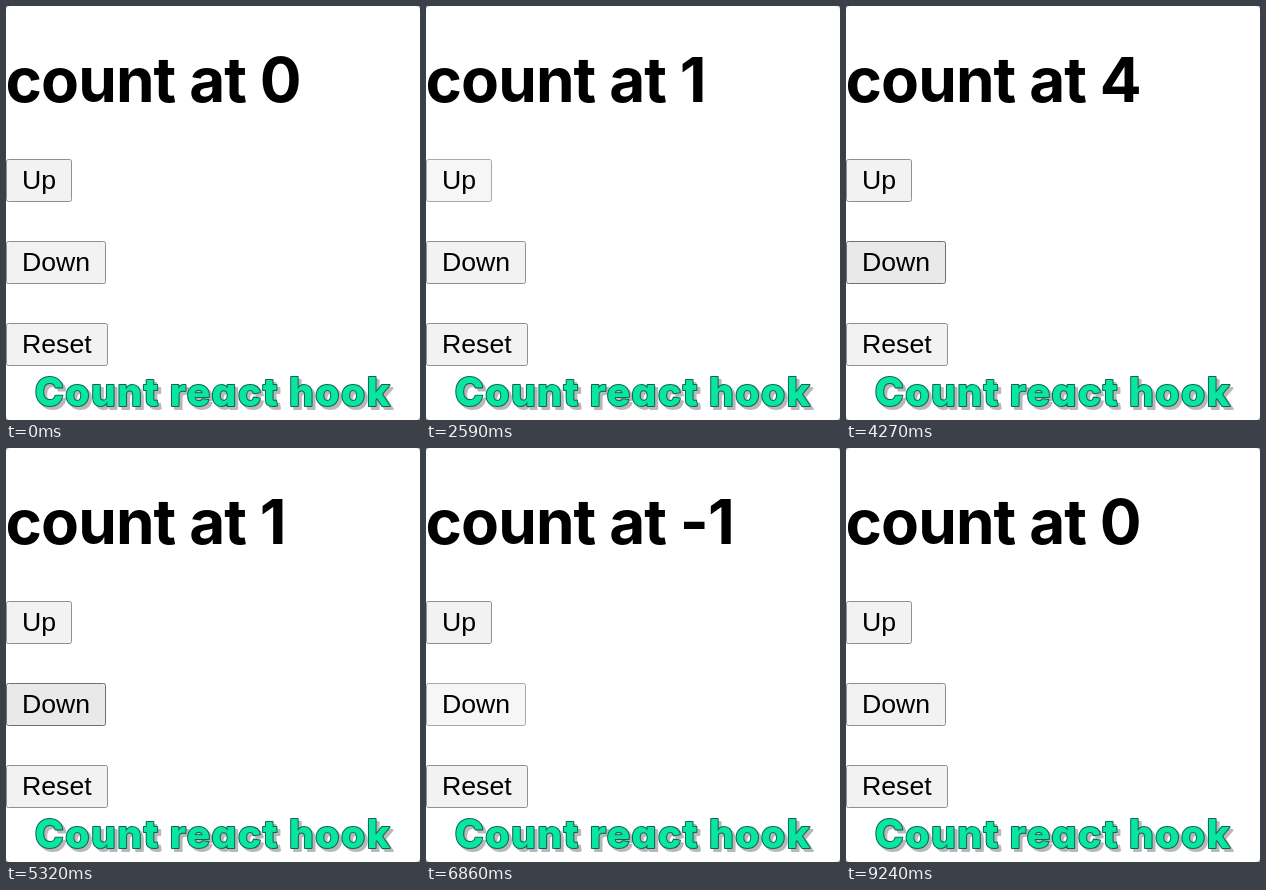
Recreate the animation shown at these times as an HTML page. Size 414 by 414 pixels, loop 9.87 s.

```html
<!DOCTYPE html>
<html lang="en">
<head>
<meta charset="utf-8">
<title>Count react hook</title>
<style>
  html, body { margin: 0; width: 100%; height: 100%; overflow: hidden; background: #999; }
  svg { display: block; width: 414px; height: 414px; }
  .heading { font: 700 62px Inter, sans-serif; letter-spacing: -.9px; }
  .button { font: 26.67px "Liberation Sans", Arial, sans-serif; }
  .button rect { fill: #f2f2f2; stroke: #909090; }
  .button.hover rect { fill: #e9e9e9; stroke: #707070; }
  .button.active rect { fill: #f6f6f6; stroke: #a8a8a8; }
  .caption {
    font: 800 39px Inter, sans-serif;
    font-feature-settings: "cv11";
    letter-spacing: 1.5px;
    text-anchor: middle;
    fill: #08e6a2;
    stroke: #0f6350;
    stroke-width: 2px;
    stroke-linejoin: round;
    paint-order: stroke;
    filter: drop-shadow(3px 3px .5px #b8b8b8);
  }
</style>
</head>
<body>
<svg viewBox="0 0 414 414">
  <rect width="414" height="414" rx="4" fill="#fff"/>
  <text class="heading" id="heading" x="-.5" y="95.5">count at 0</text>
  <g id="buttons"></g>
  <text class="caption" x="207" y="400">Count react hook</text>
</svg>
<script>
const LOOP = 9870;
const UP = 0, DOWN = 1, RESET = 2;
const heading = document.getElementById("heading");
const group = document.getElementById("buttons");

group.innerHTML = [["Up", 65], ["Down", 99], ["Reset", 101]].map(([label, width], i) => `
  <g class="button" transform="translate(0 ${153 + 82 * i})">
    <rect x=".5" y=".5" width="${width}" height="42" rx="2"/>
    <text x="16" y="29.6">${label}</text>
  </g>`).join("");
const buttons = [...group.children];

// Each click: press time, release time, button.
const clicks = [
  [1820, 1960, UP], [2590, 2660, UP], [3080, 3220, UP], [3570, 3710, UP],
  [4410, 4480, DOWN], [4760, 4900, DOWN], [5180, 5250, DOWN],
  [5600, 5740, DOWN], [6300, 6440, DOWN], [6860, 7000, DOWN],
  [8190, 8400, RESET]
];
// Each hover: enter time, leave time, button.
const hovers = [[1820, 4060, UP], [4200, 7350, DOWN], [7840, 9240, RESET]];

const apply = (count, button) => button === RESET ? 0 : count + (button === UP ? 1 : -1);

function render(time) {
  const during = ([start, end]) => time >= start && time < end;
  const count = clicks.filter(([, release]) => time >= release)
    .reduce((n, [, , button]) => apply(n, button), 0);
  const hovered = hovers.find(during)?.[2];
  const pressed = clicks.find(during)?.[2];

  heading.textContent = `count at ${count}`;
  buttons.forEach((button, i) => {
    button.classList.toggle("hover", i === hovered);
    button.classList.toggle("active", i === pressed);
  });
}

function tick() {
  render(performance.now() % LOOP);
  requestAnimationFrame(tick);
}
tick();
</script>
</body>
</html>
```
